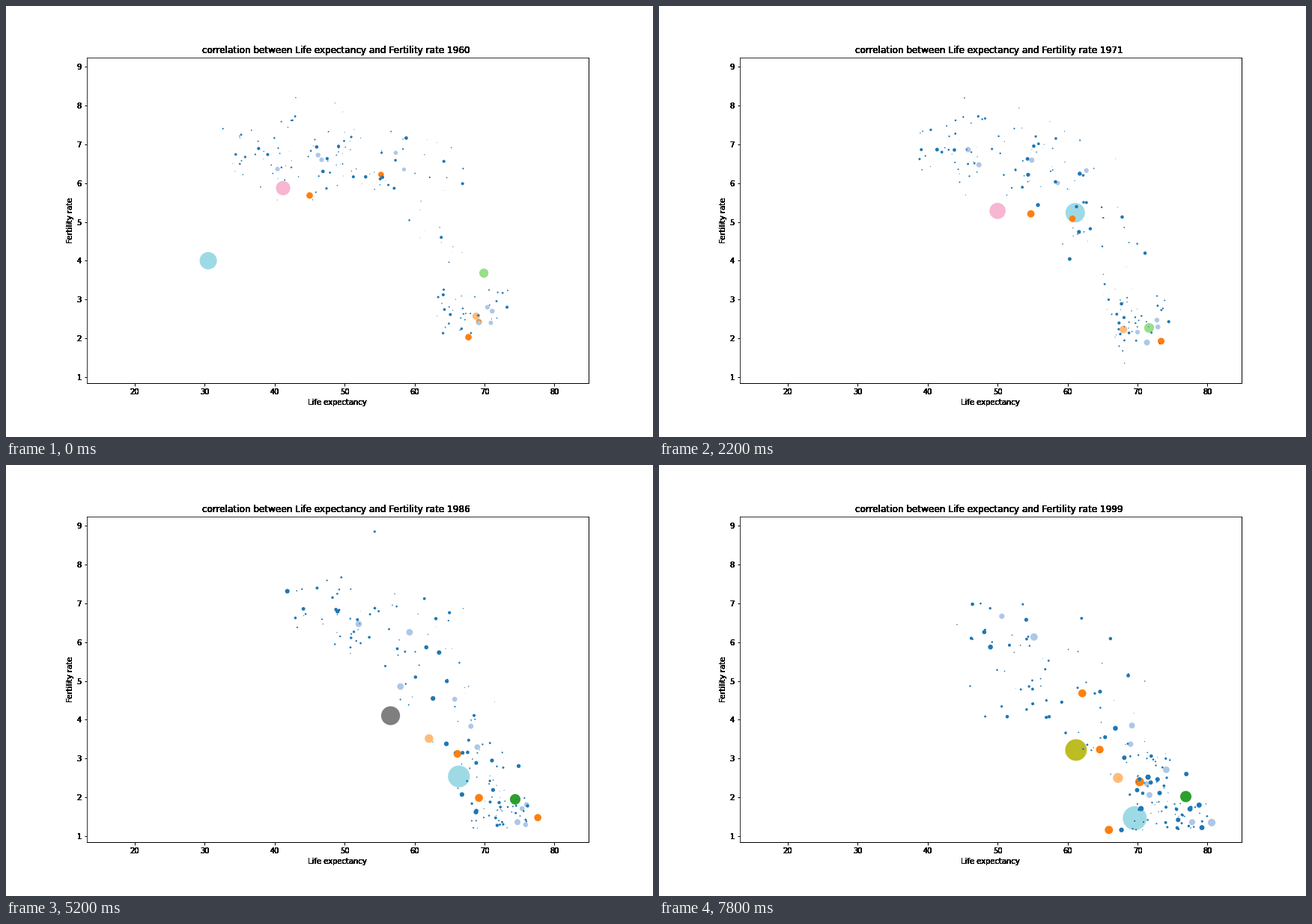
These frames come from a looping animation (864 by 576 pixels, 8000 ms). A matplotlib script:

```python
import numpy as np
import matplotlib.pyplot as plt
from matplotlib.animation import FuncAnimation

plt.rcParams["font.family"] = "DejaVu Sans"

YEARS = np.arange(1960, 2000)
U = (YEARS - 1960) / 39
PER_AREA = 1.22  # millions of people per square point

rows = []


def shock(year, height, width):
    """A passing rise or dip around one year."""
    return height * np.exp(-((YEARS - year) / width) ** 2)


def grow(start, end, bend=1.0):
    return start * (end / start) ** (U ** bend)


def ramp(start, end, bend):
    return start + (end - start) * U ** bend


def fall(start, end, mid, width):
    """S-shaped passage that meets both ends within the loop."""
    s = 1 / (1 + np.exp(-(YEARS - mid) / width))
    return start + (end - start) * (s - s[0]) / (s[-1] - s[0])


def bubble(pop, life, fert, mid, width=5.0, bend=0.8, dlife=0, dfert=0):
    people = grow(*pop) if isinstance(pop, tuple) else pop
    rows.append((ramp(*life, bend) + dlife,
                 fall(*fert, mid, width) + dfert, people))


# the giants
bubble(grow(667, 1253, 0.85) * (1 + shock(1962.5, -0.085, 2)),
       (50, 69.6), (6.2, 1.46), 1975, 3, bend=0.45,
       dlife=shock(1960, -19.5, 3),
       dfert=shock(1960, -2.2, 2) + shock(1987, 1, 5))
bubble((450, 1020), (41.2, 61.2), (5.87, 3.22), 1982, 12, bend=0.65)

# the large ones
bubble((120, 147), (68.8, 65.9), (2.57, 1.16), 1980, 12, bend=1,
       dlife=shock(1988, 3, 4), dfert=shock(1988, 0.5, 4))
bubble((93, 125), (67.7, 80.6), (2.03, 1.35), 1979, bend=0.65)
bubble((73, 82), (69.2, 77.8), (2.42, 1.36), 1971, 2, bend=1.1)
bubble((92, 218), (45, 67.2), (5.68, 2.5), 1982, 7, bend=0.65)
bubble((72, 173), (55.2, 70.3), (6.22, 2.4), 1975, 8)
bubble((45, 119), (40.4, 55.2), (6.36, 6.13), 1980, bend=0.6,
       dfert=shock(1980, 0.5, 8))
bubble((50, 127.5), (46.2, 64.6), (6.72, 3.23), 1986, bend=1.1,
       dlife=shock(1971, -5, 2), dfert=shock(1971, 0.3, 4))
bubble((46, 137), (46.7, 62.1), (6.6, 4.68), 1993, 4, bend=0.5)
bubble((37, 97), (57.3, 74.1), (6.78, 2.71), 1979, 4, bend=0.9)
bubble((33.7, 77), (58.5, 71.7), (6.35, 2.06), 1985, 6,
       dlife=shock(1970, -5, 4))
bubble((46.6, 58.5), (70.4, 78.8), (2.8, 1.8), 1973, 3, bend=1)
bubble((50, 56.5), (69.2, 79.2), (2.4, 1.22), 1978, 3, bend=1)
bubble((43, 50), (70.9, 67.7), (2.4, 1.16), 1985, 12, bend=1)
bubble((52.4, 57), (71.1, 77.5), (2.7, 1.7), 1972, 3, bend=1)
bubble((185, 279), (69.9, 76.9), (3.68, 2.02), 1967, 2.5, bend=1.1,
       dfert=shock(1979, -0.28, 6))
bubble((27, 76), (58.8, 69.2), (7.16, 3.85), 1976, 8, bend=1)
bubble((22, 65), (37.7, 50.6), (6.89, 6.66), 1980, bend=1,
       dlife=shock(1984.5, -9, 1.8), dfert=shock(1986, 0.6, 6))
bubble((27.5, 64), (46.9, 71.3), (6.3, 2.35), 1979, 8)
bubble((26, 66), (46, 69), (6.93, 3.37), 1982, 10)
bubble((21.5, 62), (47.5, 71.5), (6.63, 2.52), 1990, 3, bend=1)
bubble((26.5, 61), (55.4, 70.5), (6.15, 1.71), 1974, bend=0.7)
bubble((25, 46), (53, 75.8), (6.16, 1.42), 1971, bend=0.9)

# small ones that stand apart
bubble((5.5, 18), (32.6, 62), (7.4, 6.5), 1990, 4, bend=0.75,
       dfert=shock(1984, 1.8, 9))
bubble((3, 8), (43, 49.2), (8.2, 6), 1989, 3, dlife=shock(1994, -34.5, 0.8))
bubble((5.7, 12), (40.5, 56.8), (6.9, 5.3), 1985,
       dlife=shock(1977.3, -29.5, 2.8), dfert=shock(1977, -1, 3))

# the crowd of smaller countries
rng = np.random.default_rng(5)


def people(median, spread, growth):
    start = min(median * np.exp(rng.normal(0, spread)), 20)
    return start * growth ** U


def decline(start, end, mid, width):
    return end + (start - end) / (1 + np.exp((YEARS - mid) / width))


for _ in range(58):  # late decline
    l0 = rng.uniform(34, 51)
    dip = shock(2002, -rng.choice([0, 0, 0, 5]), 7)
    life = l0 + max(rng.normal(14.5, 3), 10) * U ** 0.85 + dip
    mid = 2012 - 1.5 * (l0 - 36) + rng.normal(0, 6)
    fert = decline(rng.normal(6.75, 0.5), 3, mid, 6) + shock(1980, 0.25, 12)
    rows.append((life, fert, people(4, 1.0, 2.6)))

for _ in range(56):  # decline in mid-period
    l0 = rng.uniform(49, 67)
    top = rng.normal(77, 2)
    life = l0 + (top - l0) * (1 - np.exp(-1.25 * U))
    mid = 1992 - 1.7 * (l0 - 48) + rng.normal(0, 7)
    fert = decline(rng.normal(6.8, 0.6), rng.uniform(1.7, 3), mid, 6.5)
    rows.append((life, fert, people(2, 1.5, 2.2)))

for _ in range(36):  # already low
    l0 = rng.uniform(63, 73.5)
    end = max(rng.uniform(69, 80), l0 + 2)
    fert = decline(rng.uniform(2.1, 3.3), rng.uniform(1.15, 1.9),
                   rng.normal(1975, 5), 4)
    rows.append((ramp(l0, end, 1), fert, people(6, 1.0, 1.25)))

LIFE, FERT, POP = (np.array(part) for part in zip(*rows))

fig, ax = plt.subplots(figsize=(12, 8), dpi=72)
fig.subplots_adjust(left=0.125, right=0.9, bottom=0.125, top=0.88)
dots = ax.scatter(LIFE[:, 0], FERT[:, 0], s=POP[:, 0] / PER_AREA, c=POP[:, 0],
                  cmap="tab20", linewidths=0)
ax.set_xlim(13.15, 84.83)
ax.set_ylim(0.846, 9.229)
ax.set_xticks(range(20, 81, 10))
ax.set_yticks(range(1, 10))
ax.tick_params(width=1)
for side, spine in ax.spines.items():
    spine.set_linewidth(0.8 if side in ("left", "top") else 1)
ax.set_xlabel("Life expectancy")
ax.set_ylabel("Fertility rate")
title = ax.set_title("", fontsize=12, x=0.497)


def harden(text, passes=12):
    """Paint the text several times so its soft edges turn dark."""
    draw = text.draw

    def repeated(renderer):
        for _ in range(passes):
            draw(renderer)

    text.draw = repeated


for label in (title, ax.xaxis.label, ax.yaxis.label,
              *ax.get_xticklabels(), *ax.get_yticklabels()):
    harden(label)


def update(i):
    pop = POP[:, i]
    dots.set_offsets(np.column_stack((LIFE[:, i], FERT[:, i])))
    dots.set_sizes(pop / PER_AREA)
    dots.set_array(pop)
    dots.set_clim(pop.min(), pop.max())
    title.set_text("correlation between Life expectancy and "
                   f"Fertility rate {YEARS[i]}")
    return dots, title


anim = FuncAnimation(fig, update, frames=len(YEARS), interval=200,
                     repeat=True, repeat_delay=0, blit=False)
plt.show()
```
